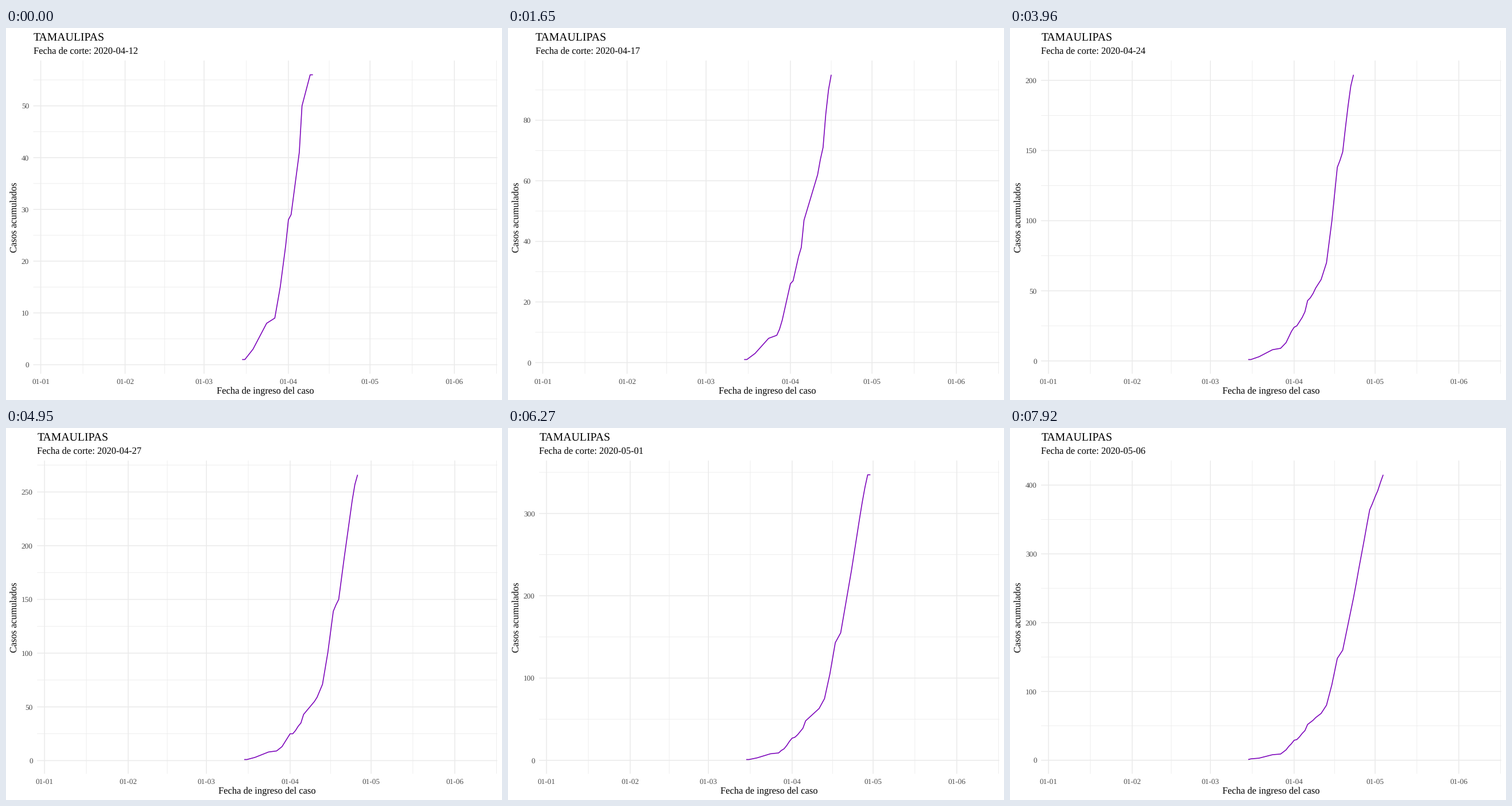
A matplotlib script that plays this animation: 864x648 px, repeating every 8000 ms.

```python
import math

import matplotlib.pyplot as plt
import numpy as np
from matplotlib.animation import FuncAnimation
from matplotlib.collections import LineCollection

plt.rcParams.update({
    "font.family": "Liberation Serif",
    "text.hinting": "none",
    "path.simplify": False,
    "toolbar": "None",
})

W, H, DPI = 864, 648, 108
RIGHT, TOP, BOTTOM = 855.75, 56.7, 602.3
LOOP, STEP, HOLD = 8000, 20, 330      # ms
GRID, PURPLE, GREY = "#EBEBEB", "#7B02BA", "#4D4D4D"
PT = 72 / DPI

# Days are counted from 1 January 2020.
MONTHS = [0, 31, 60, 91, 121, 152]
DAY_MIN, DAY_SPAN = -2.75, 170.5
FIRST_CUT, LAST_CUT = 102, 126

# Day and accumulated cases where the pace changes, once all are reported.
BENDS = [(74, 1), (78, 3), (83, 8), (86, 9), (88, 15), (91, 29), (92, 30),
         (95, 43), (96, 52), (101, 68), (103, 80), (105, 110), (107, 148),
         (109, 160), (113, 236), (119, 364), (122, 392), (124, 415)]
# Cut date and the total known by then.
TOTALS = [(102, 56), (104, 63), (107, 95), (110, 134), (114, 204),
          (119, 308), (123, 380), (126, 415)]
# Cut date and the number of older cases still to be added.
BACKLOG = [(100, 1), (114, 10), (119, 9), (123, 0)]


def follow(points, at):
    return np.interp(at, *zip(*points))


def curve(cut):
    """Days and accumulated cases as known at the cut date."""
    last = cut - 2 if cut < 107 else min(cut - 1, 124)
    days = np.array([74, 75, 78, 83, 86, *range(87, last + 1)])
    late = follow(BACKLOG, cut) * np.clip((days - 86) / 11, 0, 1)
    vals = follow(BENDS, days) - late
    # The newest days are the least complete.
    vals -= (vals[-1] - follow(TOTALS, cut)) * 0.5 ** (last - days)
    return days, np.maximum.accumulate(np.round(vals))


def tick_step(span):
    cell = span / 5
    base = 10 ** math.floor(math.log10(cell))
    for limit, factor in ((1.4, 1), (2.8, 2), (7, 5)):
        if cell <= limit * base:
            return factor * base
    return 10 * base


def layout(cut):
    days, vals = curve(cut)
    top = int(vals[-1])
    span = 1.1 * (top - 1)
    unit = (BOTTOM - TOP) / span
    high = top + 0.05 * (top - 1)

    def y(v):
        return TOP + (high - np.asarray(v)) * unit

    step = tick_step(span)
    ticks = np.arange(0, high, step)
    minor = np.arange(step / 2, high, step)
    left = 54.15 if ticks[-1] >= 100 else 47.5

    def x(d):
        return left + (np.asarray(d) - DAY_MIN) * (RIGHT - left) / DAY_SPAN

    mids = [(p + q) / 2 for p, q in zip(MONTHS, MONTHS[1:] + [183])]

    def lines(xs, ys):
        return ([[(left, v), (RIGHT, v)] for v in ys]
                + [[(u, TOP), (u, BOTTOM)] for u in xs])

    month, first = (4, 91) if cut < 121 else (5, 121)
    return {
        "left": left,
        "line": (x(days), y(vals)),
        "months": x(MONTHS),
        "ticks": [(f"{t:.0f}", float(y(t))) for t in ticks],
        "major": lines(x(MONTHS), y(ticks)),
        "minor": lines(x(mids), y(minor)),
        "date": f"2020-{month:02d}-{cut - first + 1:02d}",
    }


STATES = [layout(c) for c in range(FIRST_CUT, LAST_CUT + 1)]

fig = plt.figure(figsize=(W / DPI, H / DPI), dpi=DPI, facecolor="white")
ax = fig.add_axes([0, 0, 1, 1])
ax.set_xlim(0, W)
ax.set_ylim(H, 0)
ax.axis("off")


def text(x, y, s, px, color="black", ha="left", **kw):
    return ax.text(x, y, s, fontsize=px * PT, color=color, ha=ha,
                   va="baseline", **kw)


def grid(width):
    lc = LineCollection([], colors=GRID, linewidths=width * PT, snap=False)
    ax.add_collection(lc, autolim=False)
    return lc


minor, major = grid(0.8), grid(1.6)
line, = ax.plot([], [], color=PURPLE, lw=1.6 * PT, solid_capstyle="butt",
                solid_joinstyle="round", snap=False)

title = text(0, 22.2, "TAMAULIPAS", 19.8)
subtitle = text(0, 46, "", 16.5)
x_title = text(0, 637, "Fecha de ingreso del caso", 16.5, ha="center")
text(19.3, (TOP + BOTTOM) / 2, "Casos acumulados", 16.5, ha="center",
     rotation=90, rotation_mode="anchor")
x_labels = [text(0, 619.4, f"01-{m + 1:02d}", 13.2, GREY, "center")
            for m in range(len(MONTHS))]
y_labels = [text(0, 0, "", 13.2, GREY, "right")
            for _ in range(max(len(s["ticks"]) for s in STATES))]


def update(i):
    s = STATES[min((i * STEP + STEP // 2) // HOLD, len(STATES) - 1)]
    left = s["left"]
    minor.set_segments(s["minor"])
    major.set_segments(s["major"])
    line.set_data(*s["line"])
    title.set_x(left)
    subtitle.set_x(left)
    subtitle.set_text("Fecha de corte: " + s["date"])
    x_title.set_x((left + RIGHT) / 2)
    for label, x in zip(x_labels, s["months"]):
        label.set_x(x)
    for k, label in enumerate(y_labels):
        shown = k < len(s["ticks"])
        label.set_visible(shown)
        if shown:
            name, y = s["ticks"][k]
            label.set_text(name)
            label.set_position((left - 7.4, y + 4.6))
    return []


anim = FuncAnimation(fig, update, frames=LOOP // STEP, interval=STEP,
                     repeat=True, repeat_delay=0, cache_frame_data=False)
plt.show()
```
